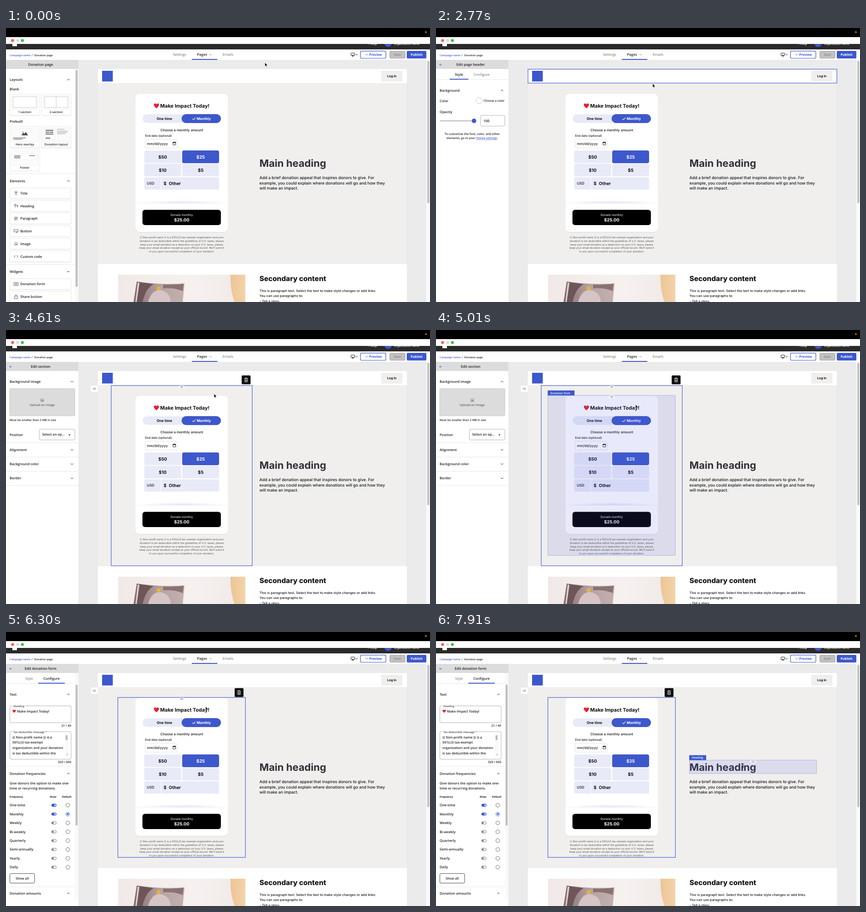
Animation of 931 by 602 pixels, one loop 8 s. Source, as an HTML page:

```html
<!DOCTYPE html>
<html lang="en">
<head>
<meta charset="utf-8">
<title>Donation page editor</title>
<style>
html, body { margin: 0; width: 100%; height: 100%; overflow: hidden; background: #fff; }
svg { display: block; width: 100vw; height: 100vh; text-rendering: geometricPrecision; }
</style>
</head>
<body>
<svg id="stage" viewBox="0 0 931 602"></svg>
<script>
const BLUE = '#3d58cc', INK = '#1f1f22', GREY = '#666', PALE = '#e8eaf8', SAND = '#f0efee';
const UI = "'Open Sans', sans-serif", PAGE = 'Inter, sans-serif';

// Drawing helpers: each returns SVG markup
const rect = (x, y, w, h, fill, o = {}) =>
  `<rect x="${x}" y="${y}" width="${w}" height="${h}" fill="${fill}" rx="${o.r || 0}"
    stroke="${o.stroke || 'none'}" stroke-width="${o.sw || 1}" stroke-dasharray="${o.dash || 'none'}"/>`;
const circle = (x, y, r, fill, stroke = 'none', sw = 1) =>
  `<circle cx="${x}" cy="${y}" r="${r}" fill="${fill}" stroke="${stroke}" stroke-width="${sw}"/>`;
const path = (d, stroke = INK, sw = 1, fill = 'none') =>
  `<path d="${d}" fill="${fill}" stroke="${stroke}" stroke-width="${sw}"/>`;
const text = (x, y, s, size, o = {}) =>
  `<text x="${x}" y="${y}" font-size="${size}" font-family="${o.font || UI}" font-weight="${o.w || 550}"
    fill="${o.fill || INK}" text-anchor="${o.a || 'start'}">${s}</text>`;
const page = (x, y, s, size, w = 450, fill = '#161618', a = 'start') => text(x, y, s, size, { font: PAGE, w, fill, a });
const mid = (x, y, s, size, w = 700, fill = '#111') => page(x, y, s, size, w, fill, 'middle');
const lines = (xs, h, y = 0) => xs.map(([x, dy, w]) => rect(x, y + dy, w, h, '#555')).join('');
const group = (id, body) => `<g id="${id}" display="none">${body}</g>`;
const rule = (y, w = 159) => rect(0, y - .4, w, .8, '#e2e2e2');
const chevron = (x, y, up, c = INK) => path(`M${x - 2.6} ${y + (up ? 1.3 : -1.3)}l2.6 ${up ? -2.6 : 2.6}l2.6 ${up ? 2.6 : -2.6}`, c, 1);
const caret = (x, y) => path(`M${x - 2.4} ${y - 1}h4.8l-2.4 2.6z`, 'none', 0, INK);
const heart = (x, y, s) =>
  `<path transform="translate(${x} ${y}) scale(${s})" fill="#e8212c" d="M0 10C-3 7-5.5 5-5.5 2.3C-5.5-1.2-1.2-1.4 0 1.5C1.2-1.4 5.5-1.2 5.5 2.3C5.5 5 3 7 0 10z"/>`;
const imageIcon = (x, y) => rect(x - 3, y - 2.8, 6, 5.6, 'none', { r: .6, stroke: GREY, sw: .8 }) +
  path(`M${x - 2} ${y + 1.8}l1.5-2 1 1 .8-1 1.2 2z`, 'none', 0, GREY);
const dots = (x, y) => [-2.4, 0, 2.4].map(dx => [-1.1, 1.1].map(dy => rect(x + dx - .6, y + dy - .6, 1.2, 1.2, '#444')).join('')).join('');
const grip = (x, y) => rect(x - 5.5, y - 3, 11, 6, '#fff') + dots(x, y);
const trash = (x, y) => rect(x, y, 19.5, 19.5, '#111', { r: 2 }) +
  path(`M${x + 6} ${y + 6.8}h7.6M${x + 8.3} ${y + 6.4}v-1h3v1M${x + 7} ${y + 7.5}v6.6h5.6v-6.6M${x + 9} ${y + 9}v3.6M${x + 10.7} ${y + 9}v3.6`, '#fff', .9);
const section = (y, s, x, up) => text(8, y + 2.6, s, 7.6) + chevron(x, y, up);

function topBars() {
  const nav = (x, s, c, w) => text(x, 61.3, s, 7.8, { a: 'middle', fill: c, w });
  return rect(0, 35, 931, 12, '#2a2a2b') +
    rect(14, 30, 10, 10, '#fff') +
    text(794, 37.4, '? Help', 7, { fill: '#fff' }) + circle(839, 33.5, 8, BLUE) +
    text(852, 36.8, 'Organization name', 6, { fill: '#fff' }) +
    rect(0, 20, 931, 15, '#fefefe') + rect(0, 0, 931, 20, '#000') + circle(922, 9, 1.7, '#f58a1f') +
    circle(14.5, 27.5, 3.2, '#fc5b57') + circle(25.5, 27.5, 3.2, '#dcdcdc') + circle(36, 27.5, 3.2, '#2ac840') +
    rect(0, 47, 931, 23, '#fff') +
    text(8, 61.5, 'Campaign name', 5.8, { w: 600, fill: BLUE }) + text(56, 61.5, '/', 6) + text(62, 61.5, 'Donation page', 5.75) +
    nav(381.2, 'Settings', GREY, 500) + nav(430.5, 'Pages', INK, 600) + nav(487.5, 'Emails', GREY, 500) +
    chevron(449, 58.5, false, '#888') + rect(408, 68, 56, 2, BLUE) +
    rect(757.5, 55, 8, 5.5, 'none', { stroke: INK, r: .7 }) + rect(759.5, 61, 4, 1.3, INK) + chevron(769.8, 58.5) +
    rect(778.3, 50.7, 55.8, 15.8, '#fff', { r: 2.5, stroke: BLUE, sw: 1.2 }) + chevron(792, 58.5, false, BLUE) +
    text(797.5, 61.2, 'Preview', 7.1, { w: 700, fill: BLUE }) +
    rect(842.5, 50.7, 34, 15.8, '#c1c1c1', { r: 2.5, stroke: '#999', sw: .8 }) + text(859.5, 61.2, 'Save', 7.1, { w: 600, a: 'middle', fill: '#858585' }) +
    rect(880, 50.3, 43, 16.7, BLUE, { r: 2.5 }) + text(901.5, 61.2, 'Publish', 7.1, { w: 700, a: 'middle', fill: '#fff' });
}

// Soft mottled print pinned to a pale wall
function photo() {
  return `<g clip-path="url(#photoClip)">` + rect(246, 542, 280, 60, 'url(#wall)') +
    path('M493 542h33v60h-24q-10-25-9-60z', 'none', 0, 'url(#tan)') +
    path('M287 557Q340 565 392 561L388 602H280z', 'none', 0, 'url(#print)') +
    path('M288 558Q312 561 324 563Q306 572 300 602H283z', 'none', 0, '#6d5558') +
    path('M345 564Q372 564 390 562L388 578Q368 570 345 572z', 'none', 0, '#8a7273') +
    path('M312 602Q320 574 340 576Q360 580 362 602z', 'none', 0, '#d6c5c6') +
    path('M284 602l5-43 4 1-6 42z', 'none', 0, '#ded2cf') +
    circle(335, 572, 4.2, '#e5b92a') + '</g>';
}

function donationCard() {
  const amount = (x, y, s, on) => (on ? rect(x + .4, y + .4, 80.2, 27, BLUE, { r: 3, stroke: '#3046ab', sw: .8 }) : rect(x, y, 81, 27.5, PALE, { r: 3 })) +
    mid(x + 40.5, y + 17.4, s, 9.7, 700, on ? '#fff' : '#111');
  const notice = ['{{ Non-profit name }} is a 501(c)3 tax-exempt organization and your',
    'donation is tax deductible within the guidelines of U.S. taxes, please',
    'keep your email donation as a deduction on your U.S. taxes, please',
    "keep your email donation receipt as your official record. We'll send it",
    'to you upon successful completion of your donation.'];
  return rect(283.5, 145.5, 204.5, 304, '#e3e2e1', { r: 9 }) + rect(284, 145, 203.5, 303, '#fff', { r: 8.5 }) +
    heart(330.3, 166.3, 1.02) + page(338.5, 174.8, 'Make Impact Today!', 11, 700, '#111') +
    rect(300, 189.5, 172, 19, PALE, { r: 9.5 }) + rect(386, 189.8, 85.5, 18.5, BLUE, { r: 9.2, stroke: '#3046ab', sw: .8 }) +
    mid(348, 201.9, 'One time', 7.75) + path('M409.3 199.3l2.3 2.4 4.6-4.9', '#fff', 1.1) + mid(434.3, 201.9, 'Monthly', 7.75, 700, '#fff') +
    mid(385.8, 226.5, 'Choose a monthly amount', 7.5, 500) + page(305.5, 239.2, 'End date (optional)', 6.5, 500) +
    rect(305.5, 244.3, 70, 19.5, '#fff', { r: 2, stroke: '#dadada', sw: .8 }) + page(309.5, 256.7, 'mm/dd/yyyy', 7.6) +
    rect(366.7, 251, 5.8, 6, '#fff', { r: .6, stroke: '#111', sw: .9 }) + rect(366.3, 250.4, 6.6, 2, '#111') +
    amount(303.5, 269.3, '$50') + amount(386.8, 269.1, '$25', true) + amount(303.5, 298.6, '$10') + amount(387, 298.6, '$5') +
    rect(303.5, 328, 164.5, 27, PALE, { r: 3 }) + rect(339.5, 328, 1, 27, '#fff') +
    page(309.3, 344.3, 'USD', 7.8) + page(346, 345, '$', 9.7, 700) + page(357.5, 345, 'Other', 9.6, 700) +
    rect(284, 372, 203.5, 13, 'url(#glow)') + rect(284, 385, 203.5, .6, '#f0f0f6') +
    rect(299.6, 399.6, 172.2, 33.3, '#000', { r: 5.5 }) + mid(385.8, 412.7, 'Donate monthly', 6.6, 400, '#fff') + mid(385.8, 424.9, '$25.00', 9.5, 700, '#fff') +
    notice.map((s, i) => mid(385.8, 462.2 + 7.72 * i, s, 5.75, 400, '#555')).join('');
}

function canvasArea() {
  return rect(159, 70, 772, 532, '#ebebec') + rect(200.8, 89.5, 680.4, 520, '#e2e2e3') +
    rect(201.5, 90, 679, 31, '#fff') + rect(201.5, 121, 679, 397.5, SAND) + rect(201.5, 518.5, 679, 84, '#fff') +
    rect(923, 70, 8, 532, '#fafafa') + rect(925, 72, 4.6, 313, '#c2c2c2', { r: 2.3 }) +
    rect(211, 94, 23.5, 23.5, BLUE) + rect(824, 94, 46.5, 23.5, SAND, { r: 1 }) + mid(847.2, 108, 'Log in', 6.9) +
    donationCard() +
    page(556.5, 305, 'Main heading', 22.2, 700, '#303036') +
    ['Add a brief donation appeal that inspires donors to give. For',
      'example, you could explain where donations will go and how they',
      'will make an impact.'].map((s, i) => page(556.5, 332 + 11.7 * i, s, 8.83)).join('') +
    page(556.5, 556.3, 'Secondary content', 15.5, 800) +
    ['This is paragraph text. Select the text to make style changes or add links.', 'You can use paragraphs to:', '- Tell a story']
      .map((s, i) => page(556.5, 579.6 + 11.6 * i, s, 7.35)).join('') + photo();
}

const panelTitle = (s, back = true) => rect(0, 70, 159, 20, '#dcdcdc') + text(76, 83.2, s, 7.7, { a: 'middle' }) +
  (back ? path('M13 80.7h-5.2m2.2-2.2l-2.2 2.2 2.2 2.2', BLUE, .9) : '');
const tabs = (active) => rule(113.3) + ['Style', 'Configure'].map((s, i) =>
  text(i ? 100 : 50.5, 104.6, s, 7.7, { a: 'middle', w: active === i ? 600 : 500, fill: active === i ? INK : GREY })).join('') +
  (active === 0 ? rect(30, 111.5, 41, 2, BLUE) : active === 1 ? rect(71, 111.5, 58, 2, BLUE) : '');
const scrollbar = (y, h, bottom) => rect(151, 90, 8, bottom - 90, '#f9f9f9') + rect(152.8, y, 4.4, h, '#bfbfbf', { r: 2.2 });
const select = (y, s) => rect(73.3, y, 78, 23.5, '#fff', { r: 2, stroke: '#aaa', sw: .9 }) + text(79.5, y + 14.4, s, 7.4) + caret(139.3, y + 12.4);
const label = (y, s) => text(8, y + 2.6, s, 7.5, { w: 600 });

function homePanel() {
  const card = (x, y, s, art) => rect(x, y + .8, 65.5, 47, '#ddd', { r: 2 }) + rect(x, y, 65.5, 47, '#fff', { r: 2, stroke: '#e2e2e2', sw: .8 }) +
    rect(x + 3.5, y + 3.5, 58.5, 30, '#fbfbfb', { stroke: '#ececec', sw: .7 }) + text(x + 32.7, y + 42, s, 6.6, { a: 'middle' }) + art;
  const dashed = (x, split) => rect(x, 151, 51, 23.5, '#fff', { stroke: '#999', sw: .8, dash: '2 1.4' }) +
    (split ? `<path d="M${x + 25.5} 151v23.5" stroke="#999" stroke-width=".8" stroke-dasharray="2 1.4"/>` : '');
  const item = (y, s, icon) => rect(8.5, y - 11.4, 134.5, 24, '#ddd', { r: 2 }) +
    rect(8.5, y - 12, 134.5, 24, '#fff', { r: 2, stroke: '#e0e0e0', sw: .8 }) + text(31.5, y + 2.7, s, 7.6) +
    `<g transform="translate(22 ${y})">${icon}</g>`;
  const icons = {
    Title: path('M-3.2 -3h6.4M0 -3v6.6', '#555', 1.3),
    Heading: path('M-4.5 -3h5.4M-1.8 -3v6.3M.8 -.8h4M2.8 -.8v4.1', '#555', 1.2),
    Paragraph: path('M-3.8 -3h7.6M-3.8 -1h7.6M-3.8 1h7.6M-3.8 3h5', '#555', .9),
    Button: rect(-4.5, -3.3, 9, 4.8, 'none', { stroke: '#555', sw: .9 }) + path('M0 0l1 4 1-1.5 2 0z', 'none', 0, '#555'),
    Image: imageIcon(0, 0),
    'Custom code': path('M-1.5 -2.5l-2.7 2.5 2.7 2.5M1.5 -2.5l2.7 2.5-2.7 2.5', '#555', 1)
  };
  return panelTitle('Donation page', false) + section(113.5, 'Layouts', 137, true) + text(8, 137.3, 'Blank', 7.6) +
    card(8.5, 145, '1-section', dashed(15.7)) + card(77.5, 145, '2-section', dashed(84.7, true)) + text(8, 208.2, 'Prebuilt', 7.6) +
    card(8.5, 216, 'Hero overlay', path('M34 235.8l4-6 2.5 3 2.8-4.5 5 7.5z', 'none', 0, '#444') + circle(37, 228.8, 1, '#444') +
      lines([[16, 0, 27], [16, 2.8, 20]], 1.1, 241)) +
    card(77.5, 216, 'Donation layout', rect(85.5, 222, 21.5, 23.5, '#fff', { stroke: '#ddd', sw: .7 }) +
      lines([[87, 2, 17], [87, 6, 8], [96, 6, 8], [87, 10, 17], [87, 19, 10]], 1.8, 222) +
      lines([[112, 0, 16], [112, 4, 23], [112, 7, 23], [112, 10, 18]], .6, 222)) +
    card(8.5, 267.3, 'Footer', rect(15, 276, 52.5, 13.5, '#fff', { stroke: '#e5e5e5', sw: .6 }) +
      lines([[18, 0, 14], [18, 2.5, 13], [18, 5, 14], [51, 0, 13]], 1.1, 280)) +
    rule(320, 151) + section(336, 'Elements', 137, true) +
    Object.keys(icons).map((s, i) => item(363.3 + 27.7 * i, s, icons[s])).join('') +
    rule(519.5, 151) + section(535.3, 'Widgets', 137, true) +
    item(562.6, 'Donation form', rect(-4.5, -3.3, 9, 6.6, 'none', { stroke: '#555', sw: .9 }) + circle(0, 0, 1.6, '#555')) +
    item(590.3, 'Share button', path('M-1.5 -1.5h-2v6h7v-6h-2M0 2v-6.5m-1.8 1.8l1.8-1.8 1.8 1.8', '#555', .9)) +
    scrollbar(92, 477, 602);
}

const headerPanel = () => panelTitle('Edit page header') + tabs(0) + section(137, 'Background', 145, true) +
  label(160, 'Color') + circle(95, 159.8, 6.7, '#fff', '#c4c4c4') + text(104.5, 162.3, 'Choose a color', 6.5) +
  label(184, 'Opacity') + rect(8, 202.4, 76, 3, '#c9c9cc', { r: 1.5 }) + circle(83.5, 204, 4.9, BLUE) +
  rect(98, 192, 53.3, 23.5, '#fff', { r: 2, stroke: '#aaa', sw: .9 }) + text(104, 206.6, '100', 7.8) +
  text(79.5, 234.5, 'To customize the font, color, and other', 6.5, { a: 'middle' }) +
  text(79.5, 244, `elements, go to your <tspan fill="${BLUE}" text-decoration="underline">theme settings</tspan>.`, 6.4, { a: 'middle' });

const sectionPanel = () => panelTitle('Edit section') + section(113.5, 'Background image', 145, true) +
  rect(8, 128.7, 143.3, 60, '#dcdcdc', { r: 2, stroke: '#c6c6c6', sw: .8 }) + imageIcon(79.5, 154.3) +
  text(79.5, 166.5, 'Upload an image', 6.8, { a: 'middle', fill: GREY }) + text(8, 200.3, 'Must be smaller than 2 MB in size', 6.3) +
  label(230, 'Position') + select(218, 'Select an op...') +
  ['Alignment', 'Background color', 'Border'].map((s, i) => rule(247.7 + 31.3 * i) + section(263.2 + 31.3 * i, s, 145)).join('') + rule(341.5);

const stylePanel = () => panelTitle('Edit donation form') + tabs() + section(137, 'Alignment', 145, true) +
  label(164.3, 'Horizontal') + select(152.5, 'Center') + rule(182) + section(197.5, 'Background', 145) + rule(213);

function configurePanel() {
  const field = (y, h, s, w) => rect(8.5, y, 134.5, h, '#fff', { r: 2.5, stroke: '#aaa', sw: .9 }) +
    rect(14, y - 2, w, 4, '#fff') + text(16, y + 2.8, s, 6, { fill: '#444' });
  const toggle = (y, on) => rect(100, y - 2.8, 10.5, 5.6, on ? BLUE : '#fff', { r: 2.8, stroke: on ? BLUE : '#555', sw: .8 }) +
    circle(on ? 107.7 : 102.8, y, 1.7, on ? '#fff' : '#555');
  const row = (s, i) => {
    const y = 380.6 + 19.45 * i;
    return text(8, y + 2.6, s, 7.6) + toggle(y, i < 2) +
      circle(135.7, y, 4.2, '#fff', i === 1 ? BLUE : '#555', .9) + (i === 1 ? circle(135.7, y, 2.2, BLUE) : '');
  };
  const right = (y, s) => text(143, y, s, 6.7, { a: 'end' });
  return panelTitle('Edit donation form') + tabs(1) + section(137, 'Text', 137, true) +
    field(162.3, 37, 'Heading', 27) + heart(18, 171, .66) + text(24, 177, 'Make Impact Today!', 7.4, { w: 600 }) + right(208.3, '21 / 40') +
    field(219, 60.5, 'Tax deductible message <tspan fill="#d22">*</tspan>', 75) +
    ['{{ Non-profit name }} is a', '501(c)3 tax-exempt', 'organization and your donation', 'is tax deductible within the']
      .map((s, i) => text(14, 233.6 + 11.7 * i, s, 7.3, { w: 600 })).join('') +
    rect(128.8, 224, 8, 48, '#f9f9f9') + rect(130.8, 226.5, 4.4, 11, '#bbb', { r: 2.2 }) + path('M132 271l4-4m-2 4l2-2', '#888', .7) +
    right(288.3, '329 / 500') + rule(295.3, 151) + section(311, 'Donation frequencies', 137, true) +
    text(8, 334.8, 'Give donors the option to make one-', 7.45) + text(8, 346.4, 'time or recurring donations.', 7.45) +
    [[8, 'Frequency'], [96, 'Show'], [123, 'Default']].map(([x, s]) => text(x, 364.4, s, 5.6, { w: 700 })).join('') +
    ['One-time', 'Monthly', 'Weekly', 'Bi-weekly', 'Quarterly', 'Semi-annually', 'Yearly', 'Daily'].map(row).join('') +
    rect(8.5, 530.7, 54.3, 21, '#fff', { r: 2.5, stroke: '#333', sw: .9 }) + text(35.7, 543.8, 'Show all', 7.2, { a: 'middle' }) +
    rule(560, 151) + section(574, 'Donation amounts', 137, true) + scrollbar(115.5, 310, 587) + rect(151, 88, 8, 2, '#dcdcdc');
}

const hoverBox = (x, y, w, h, name, gripped = true) => rect(x, y, w, h, 'rgba(80,85,225,.13)', { stroke: 'rgba(61,88,204,.55)', sw: .6 }) +
  rect(x - .3, y - 11, name.length * 3.6 + 12, 11, BLUE) + text(x + 5.5, y - 3.2, name, 6.2, { fill: '#fff' }) +
  (gripped ? grip(x + w / 2, y + 3.2) : '');
const outline = (x, y, w, h) => rect(x, y, w, h, 'none', { stroke: BLUE, sw: 1.1 });

// [layer id, markup, visible from, visible until]
const layers = [
  ['home', homePanel(), 0, 1730],
  ['headerPanel', headerPanel(), 1730, 3250],
  ['sectionPanel', sectionPanel(), 3250, 5420],
  ['stylePanel', stylePanel(), 5420, 5500],
  ['configurePanel', configurePanel(), 5500, 8000],
  ['handle', rect(186.5, 122, 15, 14, '#fff') + dots(194, 129), 2850, 8000],
  ['headerHover', hoverBox(202, 90.5, 678.3, 30.5, 'Header', false), 1240, 1730],
  ['headerSelected', outline(202, 90.5, 678.3, 30.5), 1730, 3250],
  ['sectionHover', hoverBox(231, 122, 309.6, 396, 'Section'), 2850, 3250],
  ['sectionSelected', outline(231, 122, 309.6, 396) + grip(385.7, 125.2) + trash(517.5, 99.8), 3250, 5420],
  ['formHover', hoverBox(245.6, 143.8, 280, 351.4, 'Donation form'), 4690, 5420],
  ['formSelected', outline(245.6, 143.8, 280, 351.4) + trash(502, 123.2), 5420, 8000],
  ['formGrip', grip(385.7, 147.2), 5420, 7270],
  ['columnHover', hoverBox(541, 122, 310, 396, 'Section'), 7270, 7590],
  ['headingHover', hoverBox(556.3, 281.6, 279.5, 29.4, 'Heading'), 7590, 8000],
  ['arrow', path('M0 0V8.2L1.9 6.5L3.2 9.4L4.5 8.8L3.2 6H5.8z', '#fff', .6, '#000'), 0, 7590],
  ['beam', path('M-2 -4.5q2 0 2 1.4v6.2q0 1.4 -2 1.4M2 -4.5q-2 0 -2 1.4v6.2q0 1.4 2 1.4', '#222', .8), 7590, 8000]
];

document.getElementById('stage').innerHTML = `<defs>
  <clipPath id="photoClip"><rect x="246" y="542" width="279.5" height="60"/></clipPath>
  <linearGradient id="wall"><stop stop-color="#f1e9e7"/><stop offset=".6" stop-color="#f6f1f0"/><stop offset="1" stop-color="#efe8e6"/></linearGradient>
  <linearGradient id="tan"><stop stop-color="#edc594"/><stop offset="1" stop-color="#f2d3ab"/></linearGradient>
  <linearGradient id="print"><stop stop-color="#8b7174"/><stop offset=".55" stop-color="#b8a3a4"/><stop offset="1" stop-color="#c3b1ae"/></linearGradient>
  <radialGradient id="glow" cx=".5" cy="1" r=".5"><stop stop-color="#dfe2f6"/><stop offset="1" stop-color="#fff"/></radialGradient>
  </defs>` + canvasArea() + rect(0, 70, 159, 532, '#fff') + topBars() +
  layers.slice(0, -2).map(([id, body]) => group(id, body)).join('') +
  `<circle id="ring" fill="rgba(255,255,255,.25)" stroke="#8d8bdd" stroke-width="1.6"/>` +
  layers.slice(-2).map(([id, body]) => group(id, body)).join('');

const el = id => document.getElementById(id);
const clicks = [[1730, 505.5, 106.5], [3250, 468.5, 128], [5420, 437.3, 163]];

// Pointer path: time, x, y; eased segments end at a key with a fourth value
const route = [[0, 568.5, 76], [1000, 568.5, 76], [1400, 506.5, 107.5, 1], [2530, 506.5, 107.5], [2770, 475.7, 122.3],
  [3090, 470, 128.8], [4210, 470, 128.8], [4610, 456.8, 140.3], [5010, 438.3, 163.8], [6870, 438.3, 163.8],
  [7750, 672.5, 292.5, 1], [7910, 674.3, 293.7], [8000, 674.3, 293.7]];

function pointer(t) {
  const i = route.findIndex(k => k[0] > t);
  const [t0, x0, y0] = route[i - 1], [t1, x1, y1, eased] = route[i];
  let p = Math.floor((t - t0) / 80) * 80 / (t1 - t0);
  if (eased) p = p * p * (3 - 2 * p);
  return [x0 + (x1 - x0) * p, y0 + (y1 - y0) * p];
}

function draw(t) {
  for (const [id, , from, until] of layers) el(id).setAttribute('display', t >= from && t < until ? 'inline' : 'none');
  const at = `translate(${pointer(t).join(' ')})`;
  el('arrow').setAttribute('transform', at);
  el('beam').setAttribute('transform', at);

  const click = clicks.find(([start]) => t >= start && t < start + 660);
  const ring = el('ring');
  ring.setAttribute('display', click ? 'inline' : 'none');
  if (click) {
    const age = t - click[0];
    ring.setAttribute('cx', click[1]);
    ring.setAttribute('cy', click[2]);
    ring.setAttribute('r', 10.3 + Math.min(2.3, age / 80));
    ring.setAttribute('opacity', Math.min(1, 1 - (age - 240) / 420));
  }
}

const begin = performance.now();
function tick() {
  draw((performance.now() - begin) % 8000);
  requestAnimationFrame(tick);
}
tick();
</script>
</body>
</html>
```
